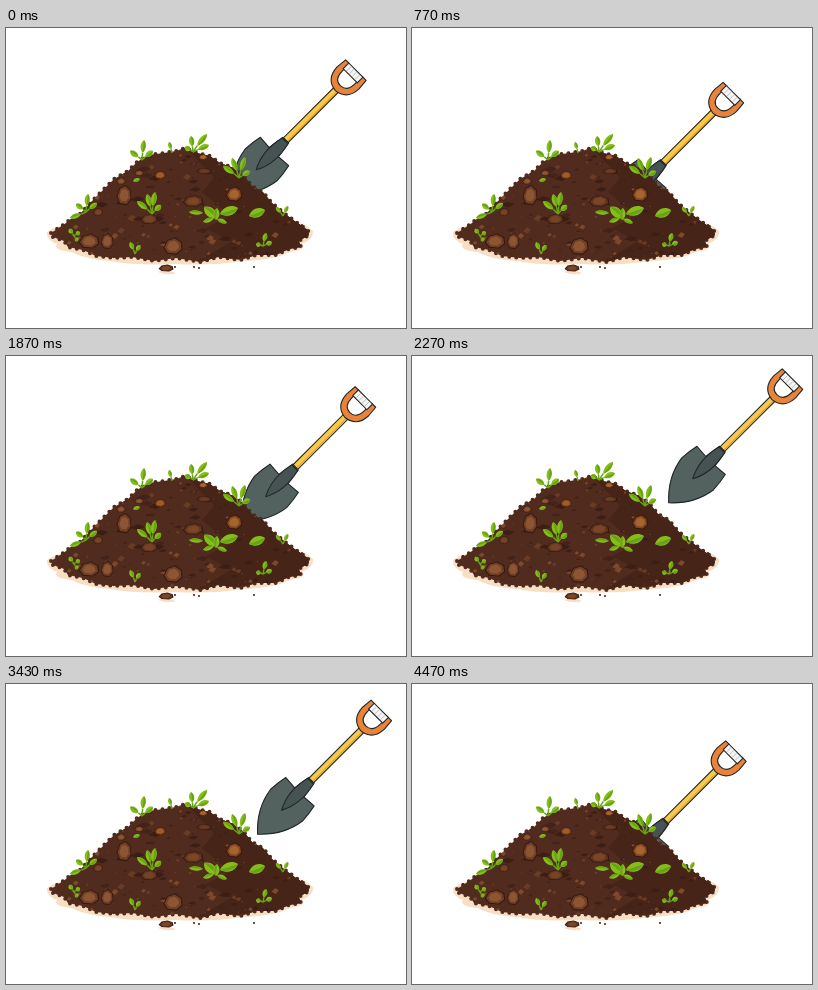
Write an HTML page that moves like this. It is 400 px wide and 300 px high and loops after 5.01 s.

```html
<!DOCTYPE html>
<html lang="en">
<head>
<meta charset="utf-8">
<title>Shovel and soil</title>
<style>
  html, body { margin: 0; width: 100%; height: 100%; overflow: hidden; background: #fff; }
  svg { display: block; width: 100%; height: 100%; }
</style>
</head>
<body>
<svg viewBox="0 0 400 300">
  <defs>
    <path id="soil" d="M45 205Q53 200 60 195Q66 189 74 186L84 175L96 163L108 151L122 143L131 134L142 127L158 125L170 123L179 120L191 125L204 128L214 135L228 140L238 148L246 158L257 164L266 175L278 185L290 194L302 202L303 207L293 213L295 219L283 221L270 227L250 227L235 232L212 229L195 234L170 230L148 233L126 229L108 230L90 228L77 222L62 219L58 213L47 209Z"/>
    <clipPath id="inside"><use href="#soil"/></clipPath>
  </defs>

  <path fill="#f8dfc3" d="M41 204Q50 197 66 196L280 192Q298 194 307 203Q308 211 296 216Q302 221 284 224Q268 232 240 233Q205 238 170 236Q130 238 104 233Q78 231 66 224Q46 222 51 216Q40 212 41 204ZM152 244Q160 240 170 245Q162 248 152 244Z"/>

  <g id="shovel" stroke="#20272a" stroke-width="1.1" stroke-linejoin="round">
    <g transform="translate(378.5 24.5) rotate(135)">
      <path fill="#fac84a" d="M24 -3.3H101V3.3H24Z"/>
      <path fill="none" stroke="#e5a52f" d="M27 -1.8H99"/>
      <path fill="#e9833a" fill-rule="evenodd" d="M-2 -14.5L9 -15.5C20 -15 26 -9 27 0C26 9 20 15 9 15.5L-2 14.5V9H8C16 9 20 6 20 0C20 -6 16 -9 8 -9H-2Z"/>
      <path fill="#f4f4f2" d="M-2 -10H6V10H-2Z"/>
      <path fill="none" stroke="#b5b8b8" stroke-width=".8" d="M-1 -6H5M-1 -2H5M-1 2H5M-1 6H5"/>
      <path fill="#53615f" d="M97 4L114 6.5L113 20Q122 22 132 22.5C150 20 162 12 173 0C162 -12 150 -20 132 -22.5Q122 -22 113 -20L114 -6.5L97 -4Z"/>
      <path fill="#465352" d="M98 4C114 8 128 6 139 0C128 -6 114 -8 98 -4Z"/>
    </g>
  </g>

  <use href="#soil" fill="#512c1e" stroke="#512c1e" stroke-width="4" stroke-linecap="round" stroke-dasharray="0 7"/>
  <g id="crumbs" clip-path="url(#inside)">
    <path fill="#462418" d="M180 120L204 128L228 140L258 165L305 205L290 225L190 234L225 214L200 200L224 188L196 164L208 150Z"/>
  </g>
  <g id="rocks"></g>
  <g id="plants"></g>
</svg>
<script>
const $ = id => document.getElementById(id);

function add(parent, name, attrs) {
  const node = document.createElementNS('http://www.w3.org/2000/svg', name);
  for (const key in attrs) node.setAttribute(key, attrs[key]);
  $(parent).append(node);
}

let seed = 11;
const random = () => (seed = seed * 16807 % 2147483647) / 2147483647;

// Loose clods and shadows
const tones = ['#3c1e15', '#3c1e15', '#6a3c26', '#42221a', '#7d482b'];
for (let i = 0; i < 230; i++) {
  const x = 45 + random() * 255, y = 122 + random() * 108, r = 0.8 + random() ** 3 * 3.5;
  const fill = tones[i % 5];
  const w = fill < '#5' ? r * 2 : r;
  add('crumbs', 'path', { fill, d: `M${x - w} ${y}l${w} ${-r}l${w} ${r * .6}l${-w * .8} ${r}Z` });
}

// Angular stone with a lit top face
function rock(x, y, w, h, fill = '#6f4027', light = '#8c5633') {
  const shape = (f, k) => add('rocks', 'path', { fill: f, transform: `translate(${x} ${y}) scale(${w * k / 2} ${h * k / 2})`,
    d: 'M-1 .2L-.6 -.7L.2 -1L.9 -.5L1 .4L.4 1L-.6 .9Z' });
  shape('#38190f', 1.15);
  shape(fill, 1);
  shape(light, .7);
}
rock(118, 167, 13, 18);
rock(83, 213, 18, 13);
rock(101, 213, 11, 14);
rock(167, 218, 17, 15);
rock(187, 173, 18, 10, '#63371f', '#7a4627');
rock(228, 166, 14, 13, '#82481f', '#a8642f');
rock(154, 147, 10, 7, '#83491f', '#a05c2b');
rock(197, 129, 8, 5, '#83491f', '#a8642f');
rock(143, 191, 15, 9, '#63371f', '#75432a');
rock(115, 153, 8, 6);
rock(133, 145, 8, 5);
rock(92, 184, 9, 7, '#63371f', '#75432a');
rock(198, 143, 13, 5, '#5c321f', '#6a3c26');
rock(160, 240, 13, 6, '#5c321f', '#7a4627');
for (const [cx, cy] of [[169, 239], [193, 240], [188, 239], [248, 239], [285, 192], [296, 197], [51, 200]])
  add('rocks', 'circle', { cx, cy, r: 1.1, fill: '#4b281b' });

// Leaf from its base to its tip, lighter on one half
function leaf(x, y, tx, ty, width) {
  const dx = tx - x, dy = ty - y, n = width / Math.hypot(dx, dy);
  const side = s => `C${x + dx * .3 - dy * n * s} ${y + dy * .3 + dx * n * s} ${x + dx * .75 - dy * n * s} ${y + dy * .75 + dx * n * s} ${tx} ${ty}`;
  add('plants', 'path', { fill: '#86bd1b', d: `M${x} ${y}${side(1)}M${x} ${y}${side(-1)}` });
  add('plants', 'path', { fill: '#67a315', d: `M${x} ${y}${side(.75)}Z` });
}
function plant(x, y, width, ...tips) {
  for (const [dx, dy] of tips) {
    const bx = x + dx * .3, by = y + dy * .35;
    add('plants', 'path', { stroke: '#67a315', 'stroke-width': 1.5, d: `M${x} ${y}L${bx} ${by}` });
    leaf(bx, by, x + dx, y + dy, width);
  }
}
plant(136, 132, 3.6, [2, -20], [-12, -9], [11, -9]);
plant(166, 125, 2.5, [-3, -11]);
plant(187, 124, 3.6, [-2, -16], [14, -18], [-8, -5], [16, -7]);
plant(233, 150, 3.6, [-16, -12], [-7, -20], [6, -21], [11, -7]);
plant(80, 184, 3.4, [2, -18], [-10, -8], [11, -9], [-16, 6]);
plant(146, 186, 3.8, [-5, -20], [3, -22], [-15, -13], [9, -9]);
plant(277, 188, 2.6, [5, -10], [-7, -9]);
plant(257, 218, 3.2, [3, -13], [-7, -2], [9, -4]);
plant(129, 226, 3, [-5, -12], [5, -9]);
plant(68, 208, 3, [-5, -7], [6, -4], [4, 5]);
leaf(127, 153, 134, 151, 2.5);
leaf(214, 186, 232, 180, 6);
leaf(211, 190, 198, 179, 6);
leaf(197, 185, 183, 184, 3);
leaf(211, 180, 210, 192, 4);
leaf(208, 190, 197, 194, 3);
leaf(211, 191, 221, 195, 3);
leaf(243, 188, 259, 182, 6);

// Time, x and y of the top of the grip
const path = [
  [0, 338, 31], [530, 312, 52], [770, 309.5, 53.5], [1070, 311, 52.5], [1430, 322, 47],
  [1600, 330, 43], [2130, 364, 17], [2270, 368.5, 12], [2670, 377.5, 7], [2930, 377, 7],
  [3200, 375, 8], [3730, 346, 27], [3870, 340, 34], [4270, 321, 50], [4470, 312, 56]
];
const LOOP = 5010, END = 4470;

function slope(i, axis) {
  const a = path[Math.max(i - 1, 0)], b = path[Math.min(i + 1, path.length - 1)];
  return (b[axis] - a[axis]) / (b[0] - a[0]);
}
function position(t, axis) {
  const i = Math.max(1, path.findIndex(p => p[0] >= t));
  const a = path[i - 1], b = path[i], span = b[0] - a[0], u = (t - a[0]) / span;
  const ease = u * u * (3 - 2 * u);
  return a[axis] + (b[axis] - a[axis]) * ease
    + span * u * (1 - u) * ((1 - u) * slope(i - 1, axis) - u * slope(i, axis));
}

function draw() {
  const t = Math.min(performance.now() % LOOP, END);
  $('shovel').setAttribute('transform', `translate(${position(t, 1) - 368} ${position(t, 2) - 12})`);
  requestAnimationFrame(draw);
}
draw();
</script>
</body>
</html>
```
